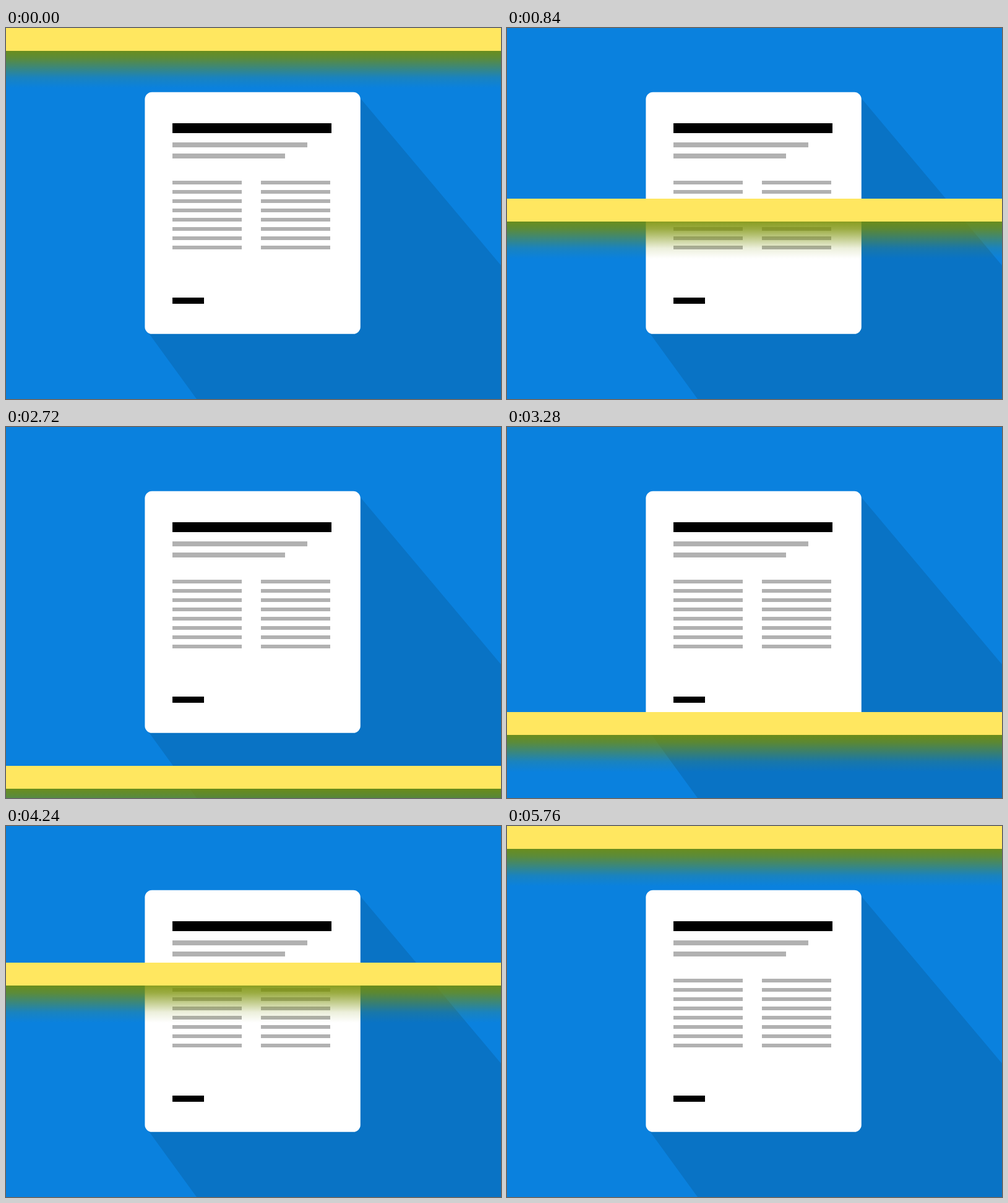
Recreate the animation shown at these times as an HTML page. Size 800 px wide and 600 px high, loop 5.8 s.

```html
<!DOCTYPE html>
<html lang="en">
<head>
<meta charset="utf-8">
<title>Document scan</title>
<style>
  html, body { margin: 0; width: 100%; height: 100%; overflow: hidden; background: #0a81de; }
  svg { display: block; }
</style>
</head>
<body>
<svg width="800" height="600" viewBox="0 0 800 600">
  <defs>
    <linearGradient id="glow" x2="0" y2="1">
      <stop stop-color="#788f00" stop-opacity=".87"/>
      <stop offset=".2" stop-color="#788f00" stop-opacity=".74"/>
      <stop offset=".72" stop-color="#788f00" stop-opacity=".14"/>
      <stop offset="1" stop-color="#788f00" stop-opacity="0"/>
    </linearGradient>
  </defs>
  <rect width="800" height="600" fill="#0a81de"/>
  <path d="M231 494L308 600H800V384L573 114V400Z" fill="#0973c5"/>
  <rect x="224.4" y="103.8" width="348.4" height="391" rx="11.5" fill="#fff"/>
  <path d="M269 154h257v16h-257zM269 436h51v10h-51z"/>
  <path id="lines" fill="#b1b1b1"/>
  <g id="scanner">
    <rect width="800" height="37" fill="#ffe760"/>
    <rect y="37" width="800" height="60" fill="url(#glow)"/>
  </g>
</svg>
<script>
  const LOOP = 5800, STEP = 40, TURN = 2440;
  const { min, max, floor, round } = Math;

  const bar = (x, y, w, h) => `M${x} ${y}h${w}v${h}h${-w}z`;
  let d = bar(269, 185, 218, 8) + bar(269, 203, 182, 8);
  for (let i = 0; i < 8; i++)
    for (const x of [269, 412]) d += bar(x, 247 + 15 * i, 112, 6);
  document.getElementById('lines').setAttribute('d', d);

  // Each trip is a steady run, bounded by slower lines where it sets off and settles.
  function down(t) {
    const setOff = t / 20;
    const run = (t - 288) / 2;
    const settle = 550 + (t - 1800) / 8;
    const drift = 550 + (t - 1800) / 40;
    return max(setOff, min(run, settle, drift));
  }

  function up(t) {
    const drift = 565 - (t - TURN) / 32;
    const setOff = 548 - (t - 2720) / 10;
    const run = 91 - (t - 4760) / 4;
    const settle = 14 - (t - 5400) / 8.7;
    const stop = 14 - (t - 5400) / 23;
    return min(drift, setOff, max(run, settle, stop, 0));
  }

  const scanner = document.getElementById('scanner');
  const start = performance.now();
  function draw() {
    const t = floor(max(0, performance.now() - start) % LOOP / STEP) * STEP;
    const y = round(t < TURN ? down(t) : up(t));
    scanner.setAttribute('transform', `translate(0 ${y})`);
    requestAnimationFrame(draw);
  }
  draw();
</script>
</body>
</html>
```
